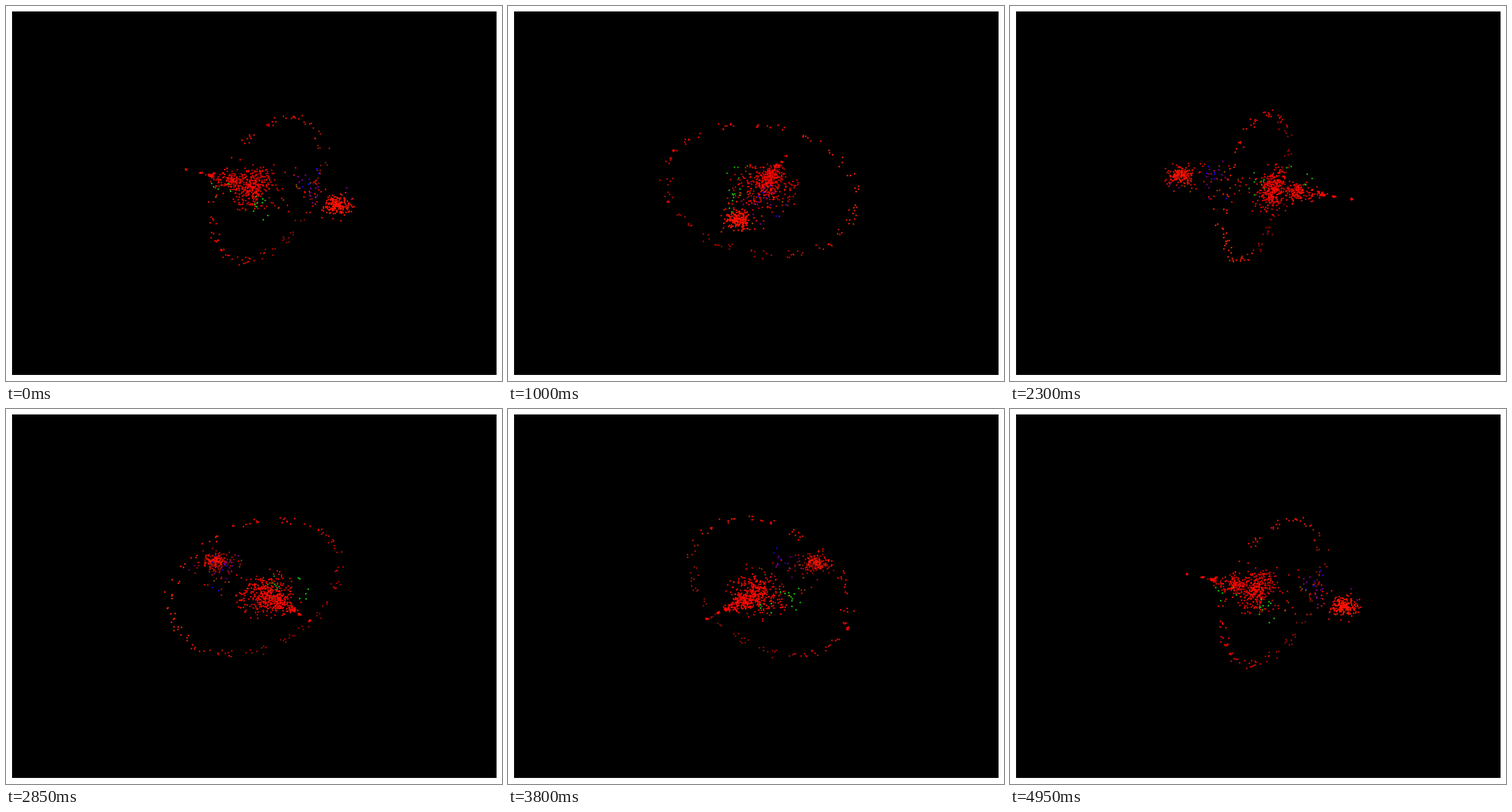
Write a matplotlib script that moves like this. It is 819x619 px and loops after 5000 ms.

```python
import numpy as np
import matplotlib.pyplot as plt
from matplotlib.animation import FuncAnimation
from matplotlib.patches import Rectangle

W, H, DPI = 819, 619, 64
FRAMES, INTERVAL = 100, 50
CENTER = 420.8, 300.9
SCALE = 432.4, 324.3
DIST = 10
ELEV = np.radians(30)
START = -56.7          # heading of the long axis in the first frame, degrees
DOT = 2.7              # dot diameter in pixels

RED, WARM = (1, .03, 0), (1, .07, 0)
GREEN, BLUE, PURPLE, OLIVE = (.1, .85, .05), (.15, 0, 1), (.55, 0, .6), (.6, .35, 0)

rng = np.random.default_rng(12)


# Positions are (along the axis, across it, height).
def blob(n, center, spread):
    return rng.normal(center, spread, (n, 3))


def ring(clumps=34, radius=.378, offset=-.036):
    sites = 360 / clumps * (np.arange(clumps) + rng.uniform(-.3, .3, clumps))
    deg = np.repeat(sites, rng.integers(2, 6, clumps))
    a = np.radians(deg + rng.normal(0, 2, deg.size))
    rad = radius + rng.normal(0, .01, a.size)
    along = rng.normal(offset, .011, a.size)
    return np.column_stack([along, rad * np.cos(a), rad * np.sin(a) + .005])


def ring_color(pts):
    """Red, turning to orange on one side."""
    color = np.tile((1., 0, 0), (len(pts), 1))
    color[:, 1] = .03 + .13 * np.clip(-pts[:, 1] / .39, 0, 1)
    return color


def disc(n, radius):
    rad = radius * rng.random(n) ** .75
    a = rng.uniform(0, 2 * np.pi, n)
    along = rng.normal(.03, .025, n)
    return np.column_stack([along, rad * np.cos(a), rad * np.sin(a)])


def spike():
    """Knots on the axis that grow in size and spread towards the middle."""
    tip, length = .3475, .215
    knots = []
    for u, n in ((0, 6), (.33, 10), (.56, 28), (1, 115)):
        spread = .0022 + .021 * u ** 2.6
        knots.append(blob(n, (tip - length * u, 0, .004), spread))
    return np.vstack(knots)


def build():
    loop = ring()
    parts = [
        (loop, ring_color(loop)),
        (spike(), RED),
        (blob(12, (.19, 0, 0), .013), RED),
        (blob(105, (.035, 0, 0), (.016, .03, .034)), RED),
        (disc(185, .135), RED),
        (blob(150, (-.343, 0, .008), .022), WARM),
        (blob(35, (-.335, 0, .008), .038), WARM),
        (blob(30, (-.13, 0, .01), (.09, .07, .06)), RED),
        (blob(8, (-.2, 0, .02), (.07, .06, .05)), OLIVE),
        (blob(16, (.03, .1, -.01), (.09, .03, .055)), GREEN),
        (blob(12, (-.2, -.05, .045), (.06, .045, .05)), PURPLE),
        (blob(7, (-.14, -.07, .05), (.05, .03, .045)), BLUE),
    ]
    points = np.vstack([pts for pts, _ in parts])
    colors = np.vstack([np.broadcast_to(c, pts.shape) for pts, c in parts])
    return points, colors


def project(pts, heading):
    along, across, up = pts.T
    s, c = np.sin(heading), np.cos(heading)
    right = along * s - across * c
    back = along * c + across * s
    depth = DIST + back * np.cos(ELEV) - up * np.sin(ELEV)
    rise = back * np.sin(ELEV) + up * np.cos(ELEV)
    zoom = DIST / depth
    x = CENTER[0] + SCALE[0] * right * zoom
    y = CENTER[1] - SCALE[1] * rise * zoom
    return np.column_stack([x, y]), depth


points, colors = build()

fig = plt.figure(figsize=(W / DPI, H / DPI), dpi=DPI, facecolor="white")
ax = fig.add_axes([0, 0, 1, 1])
ax.set_xlim(0, W)
ax.set_ylim(H, 0)
ax.axis("off")
ax.add_patch(Rectangle((10, 9), 800, 600, color="black", lw=0, antialiased=False))
dots = ax.scatter(points[:, 0], points[:, 1], s=(DOT * 72 / DPI) ** 2, linewidths=0)


def update(frame):
    heading = np.radians(START + 360 * frame / FRAMES)
    xy, depth = project(points, heading)
    # Far dots fade; the square stands for fill and outline painted over each other.
    fade = .7 * (depth - depth.min()) / np.ptp(depth)
    order = np.argsort(-depth)
    dots.set_offsets(xy[order])
    dots.set_facecolor(np.column_stack([colors, 1 - fade ** 2])[order])
    return dots,


anim = FuncAnimation(fig, update, frames=FRAMES, interval=INTERVAL,
                     repeat=True, repeat_delay=0)
plt.show()
```
